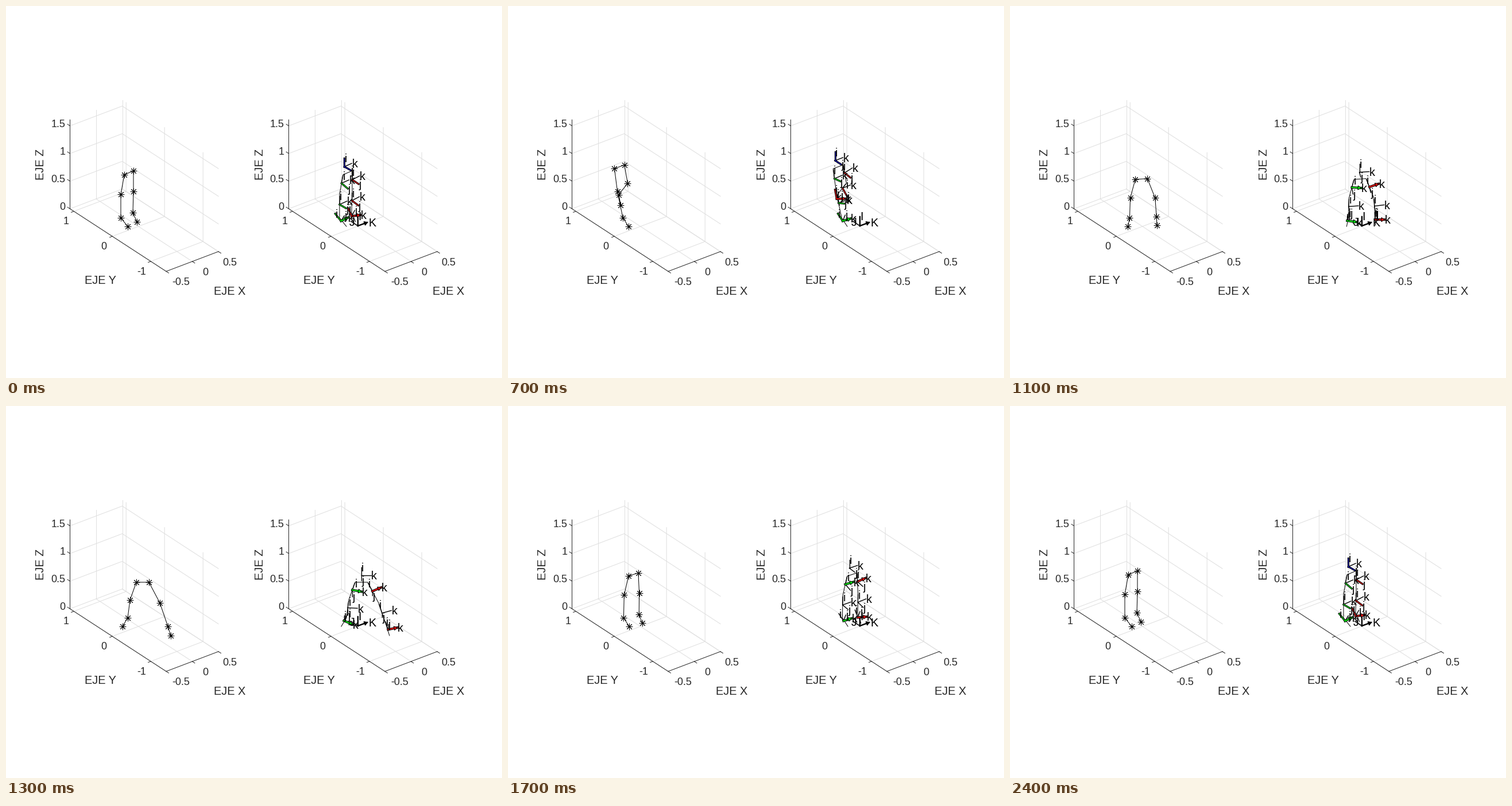
A matplotlib script for the animation above (2.5 s loop, 864x648 px).

```python
import numpy as np
import matplotlib
import matplotlib.pyplot as plt
from matplotlib.animation import FuncAnimation

matplotlib.rcParams["font.family"] = "Liberation Sans"

W, H = 864, 648
SHIFT = 381              # distance between the two plots
UNIT = 111.0             # pixels per world unit
AXIS_LEN = 17.0          # drawn length of a frame vector, in pixels
INK = "#262626"
GRID = "#dfdfdf"
BLUE, GREEN, RED = "#0000c0", "#00ee10", "#ee1010"


def chain(*pts):
    """Toe, ankle, knee, hip of one leg, then hip, knee, ankle, toe of the other."""
    return np.array(pts, float)


STAND = chain((212, 384), (200, 369), (200, 328), (206, 294),
              (222, 287), (222, 323), (221, 360), (228, 376))
LIFT = chain((210, 384), (200, 369), (190, 323), (183, 282),
             (200, 275), (207, 308), (192, 328), (196, 347))
STRIDE = chain((203, 384), (212, 369), (216, 338), (227, 307),
               (249, 307), (268, 343), (282, 384), (287, 400))

# joints further from the hips set off later in the step
LAG = 1 + .3 * (abs(np.arange(8) - 3.5) - .5)[:, None]

# segments: top joint, bottom joint, length in world units
LEG = (("thigh", .40), ("shank", .43), ("foot", .18))
SEGMENTS = [(part, top, top + way, size, color)
            for first, way, color in ((3, -1, GREEN), (4, 1, RED))
            for top, (part, size) in zip(range(first, first + 3 * way, way), LEG)]

# vectors that show their coloured face: pelvis turned, pelvis square
FACES = {"pelvis": ("ij", ""), "thigh": ("j", "k"), "shank": ("j", ""), "foot": ("ik", "k")}


def ease(t, start, end):
    u = np.clip((t - start) / (end - start), 0, 1)
    return u * u * (3 - 2 * u)


def pose_at(t):
    pts = STAND + ease(t, 0, 600) * (LIFT - STAND)
    pts += ease(t, 600, 1300) ** LAG * (STRIDE - LIFT)
    pts += ease(t, 1300, 1850) ** (1 / LAG) * (STAND - STRIDE)
    sway = np.sin(np.pi * np.clip((t - 1700) / 700, 0, 1))
    return pts - sway * np.array([4, 2])


fig = plt.figure(figsize=(W / 72, H / 72), dpi=72, facecolor="white")
ax = fig.add_axes([0, 0, 1, 1])
ax.set(xlim=(0, W), ylim=(H, 0))
ax.axis("off")


def line(*pts, color="black", lw=1.0, z=3):
    x, y = zip(*pts)
    return ax.plot(x, y, color=color, lw=lw, zorder=z)[0]


def label(x, y, s, size=20, ha="left", color="black"):
    return ax.text(x, y + .36 * size, s, size=size, ha=ha, va="baseline", color=color, zorder=6)


def draw_box(dx):
    def at(x, y, z=0):
        """Screen place of a world point."""
        return (324.5 + dx + 91 * x - 67 * (y + 1.4), 445 - 34.5 * x - 43.6 * (y + 1.4) - 96.3 * z)

    x0, x1, y0, y1, top = -.5, .5, -1.4, 1.1, 1.61
    tick = .065
    line(at(x0, y1, top), at(x0, y1), at(x0, y0), at(x1, y0), color=INK, z=2)

    for x in (x0, 0, x1):
        line(at(x, y0), at(x, y1), color=GRID, z=1)
        if x > x0:
            line(at(x, y1), at(x, y1, top), color=GRID, z=1)
        line(at(x, y0), at(x, y0 - tick), color=INK, z=2)
        label(347.5 + dx + 85 * x, 463 - 34 * x, f"{x:g}", 18, "center", INK)
    for y in (-1, 0, 1):
        line(at(x0, y), at(x1, y), at(x1, y, top), color=GRID, z=1)
        line(at(x0, y), at(x0 - .05, y), color=INK, z=2)
        label(170.5 + dx - 66 * y, 417.5 - 44 * y, f"{y:g}", 18, "center", INK)
    for z in (0, .5, 1, 1.5):
        line(at(x0, y1, z), at(x1, y1, z), at(x1, y0, z), color=GRID, z=1)
        line(at(x0, y1, z), at(x0, y1 + tick, z), color=INK, z=2)
        label(103.5 + dx, 349 - 96 * z, f"{z:g}", 18, "right", INK)

    label(390 + dx, 496, "EJE X", ha="center", color=INK)
    label(164.5 + dx, 477, "EJE Y", ha="center", color=INK)
    ax.text(61 + dx, 276, "EJE Z", size=20, rotation=90, ha="center", va="center", color=INK)


def head(tip, vec, color):
    size = np.hypot(*vec)
    if size < 5:
        return []
    d = vec / size
    n = np.array([-d[1], d[0]])
    base = tip - 6 * d
    patch = plt.Polygon([tip, base + 3.5 * n, base - 3.5 * n], fc=color, ec="black",
                        lw=1, zorder=5)
    return [ax.add_patch(patch)]


def arrow(start, vec, name, color=None):
    tip = start + vec
    if color is None:
        parts = [line(start, tip, lw=1.4, z=4)]
    else:
        lw = 4 if name == "k" else 3.2
        parts = [line(start, tip, lw=lw, z=4),
                 line(start, tip, color=color, lw=lw - 2, z=4.5)]
        if name == "k":
            parts += head(tip, vec, color)
    return parts + [label(*tip, name)]


def draw_world():
    o = np.array([613, 383])
    for vec, lw in (((0, -16.5), 2.4), ((-12, -8), 1.6), ((16, -6), 2.4)):
        line(o, o + vec, lw=lw, z=4)
    head(o + (17, -6.3), np.array([16, -6]), "black")
    label(613, 366, "I")
    label(598, 376, "J")
    label(631, 377, "K")


# View vectors are right / up / towards the viewer, seen from 30 degrees above.

def level(angle):
    """Horizontal direction, turned from the screen's right."""
    return np.array([np.cos(angle), .5 * np.sin(angle), -.866 * np.sin(angle)])


def flat(v):
    return AXIS_LEN * v[:2] * (1, -1)


def along(vec, size, sign):
    """Unit view vector of a segment of known size seen as vec."""
    u, v = np.array([vec[0], -vec[1]]) / (UNIT * size)
    out = np.array([u, v, sign * np.sqrt(max(0, 1 - u * u - v * v))])
    return out / np.linalg.norm(out)


def triad(up, side):
    """Screen vectors i, j, k with i along the segment, k close to side."""
    k = side - (side @ up) * up
    k /= np.linalg.norm(k)
    return [flat(v) for v in (up, np.cross(k, up), k)]


def draw_triad(origin, vecs, color, faces):
    return [part for name, vec in zip("ijk", vecs)
            for part in arrow(origin, vec, name, color if name in faces else None)]


draw_box(0)
draw_box(SHIFT)
draw_world()
stick, = ax.plot([], [], color="black", lw=1, marker=(8, 2, 0), ms=11.5, mew=.9,
                 mec="black", zorder=4)
twin, = ax.plot([], [], color="black", lw=1, zorder=3)
live = []


def update(n):
    pts = pose_at(n * 100)
    stick.set_data(*pts.T)
    pts = pts + (SHIFT, 0)
    twin.set_data(*pts.T)

    while live:
        live.pop().remove()

    # the line through the hips gives the heading of the whole body
    hips = pts[4] - pts[3]
    angle = np.arctan2(-2 * hips[1], hips[0])
    side, front = level(angle), flat(level(angle - np.pi / 2))
    square = int(angle < np.radians(35.5))

    origin = (pts[3] + pts[4]) / 2 - .5 * front - (0, 7.5)
    vecs = triad(np.array([0, .866, .5]), side)
    live.extend(draw_triad(origin, vecs, BLUE, FACES["pelvis"][square]))

    for part, a, b, size, color in SEGMENTS:
        foot = part == "foot"
        bone = pts[a] - pts[b]
        vecs = triad(along(bone, size, -1 if foot else 1), side)
        origin = pts[a] - .5 * bone - .3 * front if foot else pts[a] - .433 * bone
        live.extend(draw_triad(origin, vecs, color, FACES[part][square]))
    return []


anim = FuncAnimation(fig, update, frames=25, interval=100, repeat=True,
                     repeat_delay=0, init_func=lambda: [], blit=False)
plt.show()
```
